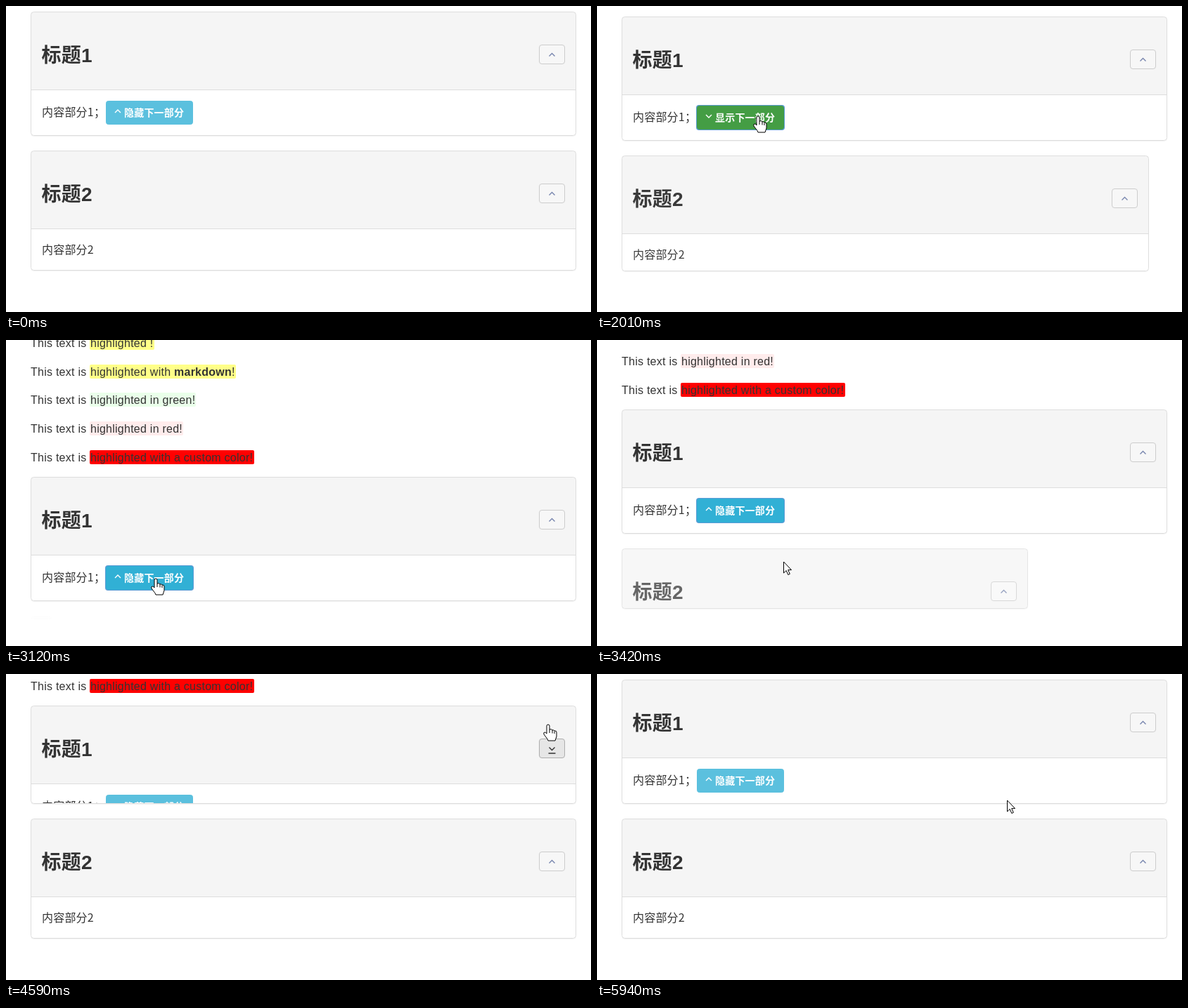
Write an HTML page that moves like this. It is 832 by 436 pixels and loops after 5970 ms.

```html
<!DOCTYPE html>
<html lang="zh">
<head>
<meta charset="utf-8">
<style>
html, body { margin: 0; width: 100%; height: 100%; overflow: hidden; background: #fff; }
#stage { display: block; }
text { fill: #333; letter-spacing: .2px; white-space: pre; }
.line { font: 16px "Liberation Sans", Arial, sans-serif; letter-spacing: .25px; }
.title { font: bold 28px "Liberation Sans", "Noto Sans CJK SC", "Noto Sans CJK", sans-serif; }
.body { font: 16px "Noto Sans CJK SC", "Noto Sans CJK", sans-serif; }
.label { font: bold 14px "Noto Sans CJK SC", "Noto Sans CJK", sans-serif; fill: #fff; }
.icon { fill: none; stroke-width: 1.4; }
</style>
</head>
<body>
<svg id="stage" width="832" height="436" viewBox="0 0 832 436"></svg>
<script>
const NS = 'http://www.w3.org/2000/svg';
const LOOP = 5970;
const HIDE = 1945, SHOW = 3050, FADE = 560, SETTLE = 3630;
const COLLAPSE = 4372, EXPAND = 5440, SLIDE = 400;
const GAP = 21, PAGE_END = 398;
const UP = 'M-4 2L0 -2L4 2', DOWN = 'M-4 -2L0 2L4 -2', DOWN_BAR = 'M-4 -2L0 2L4 -2M-5 6.5H5';
const stage = document.getElementById('stage');

function set(node, attrs) {
  for (const key in attrs) node.setAttribute(key, attrs[key]);
  return node;
}
function add(parent, tag, attrs, content) {
  const node = set(document.createElementNS(NS, tag), attrs);
  if (content) node.textContent = content;
  return parent.appendChild(node);
}

// Highlighted lines, placed by baseline above the first panel.
const intro = add(stage, 'g', {});
[
  [-185, 92, '#ffff88', 'highlighted !'],
  [-144, 208, '#ffff88', 'highlighted with ', 'markdown', '!'],
  [-104, 151, '#eaffea', 'highlighted in green!'],
  [-63, 133, '#ffecec', 'highlighted in red!'],
  [-22, 234, '#ff0000', 'highlighted with a custom color!']
].forEach(([y, width, fill, text, strong, tail]) => {
  add(intro, 'rect', { x: 119, y: y - 16, width, height: 20, rx: 2, fill });
  add(intro, 'text', { x: 35, y, class: 'line' }, 'This text is');
  const marked = add(intro, 'text', { x: 120, y, class: 'line' });
  add(marked, 'tspan', {}, text);
  if (strong) {
    add(marked, 'tspan', { 'font-weight': 'bold' }, strong);
    add(marked, 'tspan', {}, tail);
  }
});

function makePanel(title, text, textY) {
  const root = add(stage, 'g', {});
  const shadow = add(root, 'rect', { x: .5, y: 1.5, rx: 4, fill: 'none', stroke: '#000', 'stroke-opacity': .05 });
  const back = add(root, 'rect', { x: .5, y: .5, rx: 4, fill: '#fff' });
  const clip = add(root, 'svg', { x: 0, y: 0, overflow: 'hidden' });
  add(clip, 'rect', { x: .5, y: .5, width: '100%', height: 118, rx: 4, fill: '#f5f5f5' });
  add(clip, 'rect', { x: 0, y: 111, width: '100%', height: 80, fill: '#fff' });
  add(clip, 'rect', { x: 0, y: 111, width: '100%', height: 1, fill: '#ddd' });
  add(clip, 'text', { x: 15.5, y: 71.5, class: 'title' }, title);
  add(clip, 'text', { x: 16, y: textY, class: 'body' }, text);
  const toggle = add(clip, 'g', {});
  const face = add(toggle, 'rect', { x: -17.5, y: 47.5, width: 36, height: 27, rx: 3.5 });
  const icon = add(toggle, 'path', { class: 'icon', transform: 'translate(.5 61.5)' });
  const edge = add(root, 'rect', { x: .5, y: .5, rx: 4, fill: 'none', stroke: '#ddd' });

  function update(y, width, height, opacity, hover, collapsed) {
    set(root, { transform: `translate(35 ${Math.round(y)})`, opacity,
      visibility: height < 1 ? 'hidden' : 'visible' });
    const size = { width: Math.max(0, Math.round(width) - 1), height: Math.max(0, Math.round(height) - 1) };
    [shadow, back, clip, edge].forEach(node => set(node, size));
    set(toggle, { transform: `translate(${Math.round(width) - 35} 0)` });
    set(face, { fill: hover ? '#e6e6e6' : '#f7f7f7', stroke: hover ? '#adadad' : '#ccc' });
    set(icon, { d: collapsed ? DOWN_BAR : UP, stroke: hover ? '#333' : '#7684ad' });
  }
  return { clip, update };
}

const first = makePanel('标题1', '内容部分1；', 149);
const second = makePanel('标题2', '内容部分2', 147);

const action = add(first.clip, 'g', {});
const focusRing = add(action, 'rect', { x: 106, y: 126, width: 126, height: 36, rx: 4, fill: '#5b9bd5' });
const actionFace = add(action, 'rect', { x: 107.5, y: 127.5, width: 123, height: 33, rx: 3 });
add(action, 'path', { class: 'icon', stroke: '#fff', 'stroke-width': 2, transform: 'translate(124 142)' });
const actionIcon = action.lastChild;
const actionLabel = add(action, 'text', { x: 133, y: 149, class: 'label' });

const pointer = add(stage, 'g', { fill: '#fff', stroke: '#000', 'stroke-linejoin': 'round' });
const arrow = add(pointer, 'path', { d: 'M.5 0V16L4.2 12.5L6.8 18.5L9.3 17.4L6.7 11.6H11.5Z' });
const hand = add(pointer, 'path', {
  d: 'M-2 13V2Q-2 0 0 0Q2 0 2 2V7Q5 6 6 8Q8 7.3 9 9Q12 8.5 12 11V17Q11 20 10 23H0Q-1 20 -3 18L-6 14Q-7 11 -4.5 11Q-3 11.5 -2 13ZM2 7V12M6 8V12.5M9 9.5V13'
});
const path = [
  [1840, 330, 0], [1930, 229, 157], [2600, 229, 157], [2960, 213, 340], [3180, 213, 340],
  [3420, 265, 316], [3700, 300, 300], [4260, 771, 72], [4780, 771, 72], [5000, 776, 132],
  [5500, 776, 132], [5880, 583, 180], [5970, 583, 180]
];
const handTimes = [[1900, 2640], [2930, 3280], [4230, 5540]];

const within = (t, from, to) => t >= from && t < to;
const swing = k => .5 - Math.cos(Math.PI * Math.min(1, Math.max(0, k))) / 2;

function cursorAt(t) {
  const i = path.findIndex(point => point[0] > t);
  const [t0, x0, y0] = path[i - 1], [t1, x1, y1] = path[i];
  const k = swing((t - t0) / (t1 - t0));
  return [x0 + (x1 - x0) * k, y0 + (y1 - y0) * k];
}

function secondSize(t) {
  if (t < SHOW) {
    const p = 1 - swing((t - HIDE) / FADE);
    return [p, 171 * p];
  }
  // The body row joins once the opening fade is over.
  const p = swing((t - SHOW) / FADE);
  return [p, t < SETTLE ? 115 * p : 171];
}

function render(t) {
  const [p, height] = secondSize(t);
  const folded = 65 * (swing((t - COLLAPSE) / SLIDE) - swing((t - EXPAND) / SLIDE));
  // The page is scrolled to its end, so everything is stacked up from the bottom.
  const secondTop = PAGE_END - GAP * p - height;
  const firstTop = Math.round(secondTop - GAP - 177 + folded);

  set(intro, { transform: `translate(0 ${firstTop})` });
  first.update(firstTop, 776, 177 - folded, 1, within(t, 4230, 5540), within(t, COLLAPSE, EXPAND));
  second.update(secondTop, 776 * p, height, p, false, false);

  const hidden = within(t, HIDE, SHOW);
  const active = within(t, 1910, COLLAPSE);
  set(focusRing, { visibility: within(t, HIDE, COLLAPSE) ? 'inherit' : 'hidden' });
  const fill = hidden ? '#449d44' : active ? '#31b0d5' : '#5bc0de';
  set(actionFace, { fill, stroke: fill });
  set(actionIcon, { d: hidden ? DOWN : UP });
  actionLabel.textContent = hidden ? '显示下一部分' : '隐藏下一部分';

  const shown = t >= path[0][0];
  set(pointer, { visibility: shown ? 'visible' : 'hidden' });
  if (shown) {
    const [x, y] = cursorAt(t);
    const isHand = handTimes.some(([from, to]) => within(t, from, to));
    set(pointer, { transform: `translate(${Math.round(x)} ${Math.round(y)})` });
    set(arrow, { display: isHand ? 'none' : 'inline' });
    set(hand, { display: isHand ? 'inline' : 'none' });
  }
}

const start = performance.now();
function tick() {
  render((performance.now() - start) % LOOP);
  requestAnimationFrame(tick);
}
tick();
</script>
</body>
</html>
```
